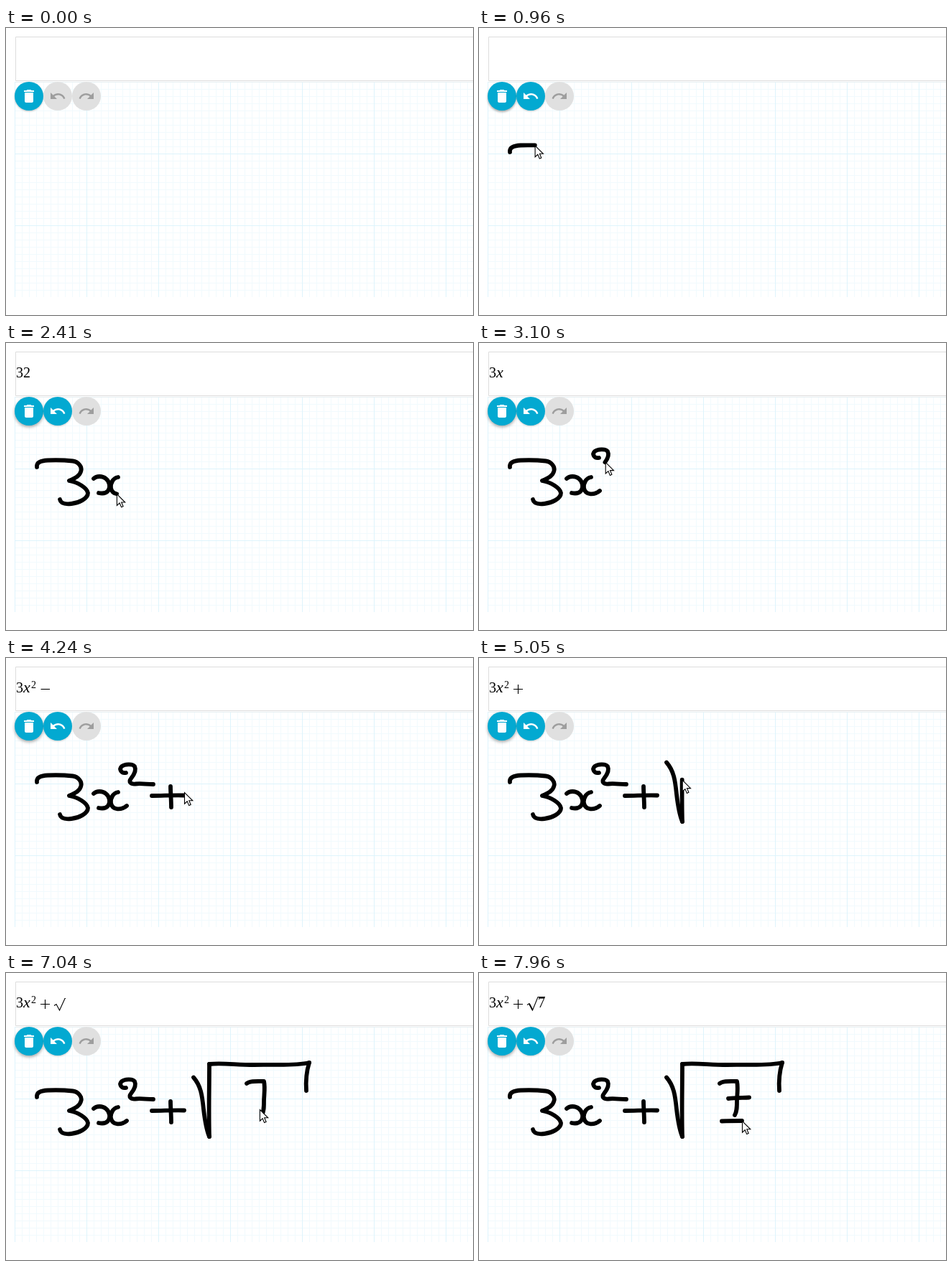
An HTML page for the animation above (8000 ms loop, 650 px wide and 400 px high).

```html
<!DOCTYPE html>
<html lang="en">
<head>
<meta charset="utf-8">
<title>Handwritten formula</title>
<style>
  html, body { margin: 0; width: 100%; height: 100%; overflow: hidden; background: #fff; }
  svg { display: block; width: 650px; height: 400px; }
  #ink path { fill: none; stroke: #000; stroke-width: 5.8; stroke-linecap: round; stroke-linejoin: round; }
  #formula text { font: 20px "Liberation Serif", "Noto Serif", serif; }
  #formula .var { font-style: italic; font-size: 22px; }
  #formula .sup { font-size: 14px; }
  #formula path { fill: none; stroke: #000; stroke-width: 1.1; }
</style>
</head>
<body>
<svg viewBox="0 0 650 400">
  <defs>
    <pattern id="minor" x="12" y="75" width="10" height="10" patternUnits="userSpaceOnUse">
      <path d="M.5 0V10M0 .5H10" stroke="#f1fafd" fill="none"/>
    </pattern>
    <pattern id="major" x="12" y="75" width="100" height="100" patternUnits="userSpaceOnUse">
      <path d="M.5 0V100M0 .5H100" stroke="#def4fc" fill="none"/>
    </pattern>
    <path id="undoIcon" d="M12.5 8c-2.65 0-5.05.99-6.9 2.6L2 7v9h9l-3.62-3.62c1.39-1.16 3.16-1.88 5.12-1.88 3.54 0 6.55 2.31 7.6 5.5l2.37-.78C21.08 11.03 17.15 8 12.5 8z"/>
  </defs>

  <path d="M660 12.5H13.5V73.5H660" fill="none" stroke="#dcdcdc"/>
  <rect x="12" y="75" width="638" height="300" fill="url(#minor)"/>
  <rect x="12" y="75" width="638" height="300" fill="url(#major)"/>
  <path d="M13 75.5H650" stroke="#e6eef1"/>

  <g id="formula">
    <text id="three" x="14" y="48">3</text>
    <text id="two" x="24" y="48">2</text>
    <text id="ex" class="var" x="24" y="48">x</text>
    <text id="square" class="sup" x="35" y="41.5">2</text>
    <path id="minus" d="M48.5 43.5H61"/>
    <path id="plus" d="M48 43.5H61M54.5 37V50"/>
    <path id="emptyRoot" d="M67 45.5L70 43.5L74.5 52L82 35.5H83"/>
    <g id="root">
      <path d="M67 44.5L70 42.5L74.5 52L82 33.5H92"/>
      <path d="M70 43L74.5 51.5" style="stroke-width:1.8"/>
      <text x="82" y="48">7</text>
    </g>
  </g>

  <g id="buttons">
    <circle id="trash" cx="32" cy="95" r="20" fill="#03a9d1"/>
    <circle id="undo" cx="72" cy="95" r="20"/>
    <circle cx="112" cy="95" r="20" fill="#e0e0e0"/>
    <path transform="translate(20 83)" fill="#fff" d="M6 19c0 1.1.9 2 2 2h8c1.1 0 2-.9 2-2V7H6v12zM19 4h-3.5l-1-1h-5l-1 1H5v2h14V4z"/>
    <use id="undoMark" href="#undoIcon" x="60" y="83"/>
    <use href="#undoIcon" transform="translate(124 83) scale(-1 1)" fill="#9e9e9e"/>
  </g>

  <g id="ink"></g>
  <path id="cursor" d="M.5 .5V16.2L4.2 12.8L6.7 18.6L9.2 17.5L6.8 11.8H11.8Z" fill="#fff" stroke="#000" stroke-width="1.1"/>
</svg>
<script>
const LOOP = 8000;
const $ = id => document.getElementById(id);

// Pen strokes: start, end, path
const strokes = [
  [800, 1520, "M43 173C42 166 49 164 58 163.5C70 163 84 163.5 93 164.5C101 165.5 106 173 104.5 178C103 185 97 188 88 192C100 194 113 202 114 209C114 217 101 223 91 224C82 225 76 223 75 218"],
  [1760, 2010, "M122 189C126 185 134 185 139 189C144 193 146 201 142 206C139 210 134 210 129 209"],
  [2180, 2520, "M156 187C149 188 145 196 146 202C148 213 161 212 168 206"],
  [2860, 3300, "M167 160C160 161 157 155 161 151C165 148 176 147 179 151C182 157 178 163 174 168C170 173 174 176 180 175.5C188 174.5 196 176 205 176"],
  [3600, 3820, "M203 192C218 192 233 191 248 191.5"],
  [3960, 4120, "M229 179C229 188 230 198 230 208"],
  [4530, 4810, "M261 145.5C271 157 273 170 275 190C277 207 279 219 283 228"],
  [4930, 5140, "M283 228C282 195 283 160 283 127"],
  [5140, 5560, "M283 127C300 125 320 128 345 128C370 127 400 130 422 125"],
  [5560, 5740, "M422 125C418 138 417 150 418 164"],
  [6480, 6950, "M335 154C340 150 350 151 359 151C361 160 359 171 359 179C359 187 359 193 356 198"],
  [7180, 7380, "M347 175C356 174 366 174 376 173.5"],
  [7690, 7950, "M338 206.5C347 206 356 206 366 206"]
].map(([start, end, d]) => {
  const path = document.createElementNS("http://www.w3.org/2000/svg", "path");
  path.setAttribute("d", d);
  $("ink").append(path);
  const length = path.getTotalLength();
  path.style.strokeDasharray = `${length} ${length + 20}`;
  return { start, end, path, length };
});

// Cursor stops while the pen is up: time, x, y
const hover = [
  [270, 553, 394], [1700, 128, 191], [2640, 176, 186], [4240, 248, 187],
  [4400, 261, 145], [6210, 350, 161], [7480, 376, 173]
];

const stops = hover.concat(strokes.flatMap(({ start, end, path, length }) => {
  const a = path.getPointAtLength(0), b = path.getPointAtLength(length);
  return [[start, a.x, a.y], [end, b.x, b.y]];
})).sort((a, b) => a[0] - b[0]);

// Formula parts: id, shown from, shown until
const parts = [
  ["three", 1880, LOOP], ["two", 2400, 2850], ["ex", 2850, LOOP],
  ["square", 3540, LOOP], ["minus", 4160, 4330], ["plus", 4330, LOOP],
  ["emptyRoot", 6400, 7300], ["root", 7300, LOOP]
];

const clamp = v => Math.max(0, Math.min(1, v));
const ease = v => v * v * (3 - 2 * v);
const show = (el, on) => { el.style.display = on ? "" : "none"; };

function cursorAt(t) {
  const s = strokes.find(s => t >= s.start && t < s.end);
  if (s) {
    const p = s.path.getPointAtLength(s.length * (t - s.start) / (s.end - s.start));
    return [p.x, p.y];
  }
  const i = stops.findIndex(k => k[0] > t);
  if (i < 0) return stops[stops.length - 1].slice(1);
  if (i === 0) return stops[0].slice(1);
  const [t0, x0, y0] = stops[i - 1], [t1, x1, y1] = stops[i];
  const f = ease((t - t0) / (t1 - t0));
  return [x0 + (x1 - x0) * f, y0 + (y1 - y0) * f];
}

function draw(t) {
  for (const { start, end, path, length } of strokes) {
    show(path, t > start);
    path.style.strokeDashoffset = length * (1 - clamp((t - start) / (end - start)));
  }
  for (const [id, from, until] of parts) show($(id), t >= from && t < until);

  const active = t >= 800;
  const lift = ease(clamp((t - 800) / 220));
  $("trash").style.filter = `drop-shadow(0 ${1.5 + lift}px ${1 + lift}px rgba(0,0,0,${0.25 + 0.1 * lift}))`;
  $("undo").style.filter = active ? "drop-shadow(0 1px 1px rgba(0,0,0,.2))" : "none";
  $("undo").setAttribute("fill", active ? "#03a9d1" : "#e0e0e0");
  $("undoMark").setAttribute("fill", active ? "#fff" : "#9e9e9e");

  const [x, y] = cursorAt(t);
  show($("cursor"), t >= 270);
  $("cursor").setAttribute("transform", `translate(${x.toFixed(1)} ${y.toFixed(1)})`);
}

const begin = performance.now();
function tick() {
  draw((performance.now() - begin) % LOOP);
  requestAnimationFrame(tick);
}
tick();
</script>
</body>
</html>
```
